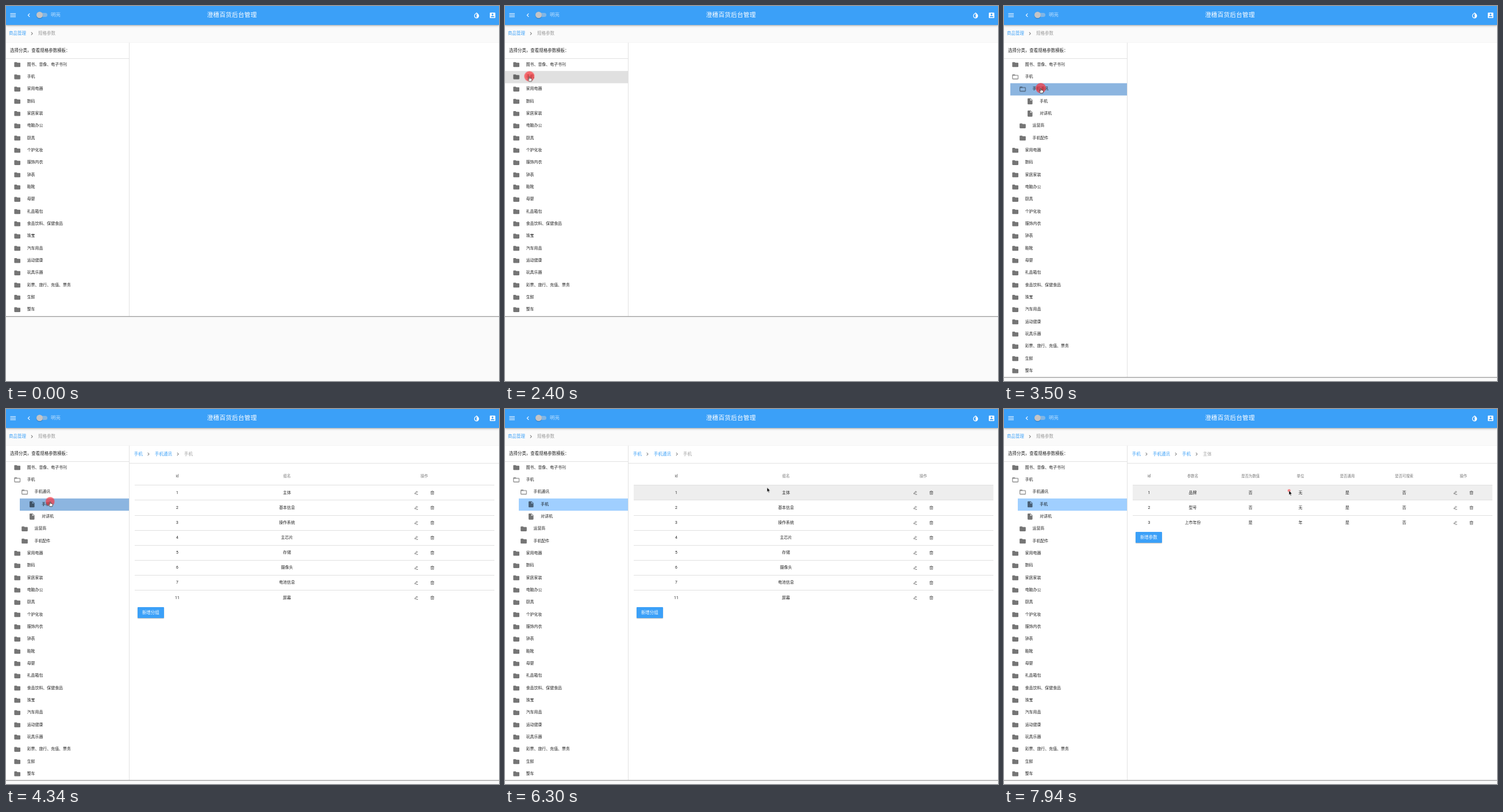
These frames come from a looping animation (858 px wide and 653 px high, 8000 ms). An HTML page:

```html
<!DOCTYPE html>
<html lang="zh-CN">
<head>
<meta charset="utf-8">
<title>后台管理</title>
<style>
*{box-sizing:border-box}
html,body{margin:0;width:100%;height:100%;overflow:hidden}
body{position:relative;background:#fafafa;color:rgba(0,0,0,.87);
  font:6.93px/1 Roboto,"Noto Sans CJK SC","Noto Sans CJK",sans-serif;white-space:nowrap}
.abs,.abs>*,.row>*{position:absolute}
svg{display:block;overflow:visible;fill:currentColor}
.line{fill:none;stroke:currentColor;stroke-width:1.8}

.bar{left:0;top:0;width:100%;height:33px;background:#3ba0f8;color:#fff;
  box-shadow:0 1px 2px rgba(0,0,0,.22),0 2px 4px rgba(0,0,0,.14)}
.title{left:349.7px;top:10.6px;font-size:10.67px;font-weight:500;letter-spacing:.2px}
.track{left:54px;top:12.3px;width:18px;height:7px;border-radius:4px;background:#80b6e6}
.knob{left:53px;top:10px;width:11px;height:11px;border-radius:50%;background:#c4c4c6;
  box-shadow:0 1px 1px rgba(0,0,0,.25)}
.mode{left:78px;top:11.2px;font-size:8.53px;color:rgba(255,255,255,.68)}

.crumb{font-size:7.47px;color:#3ba0f8}
.grey{color:rgba(0,0,0,.38)}
.sep{color:rgba(0,0,0,.54)}

.card{position:absolute;left:0;top:63px;width:100%;height:478px;background:#fff;
  border-top:1px solid #f4f4f4;border-bottom:1px solid #999;box-shadow:0 1px 1px rgba(0,0,0,.1);
  animation:card 8s linear infinite}
.side{position:relative;width:215px;height:100%;border-right:1px solid #e2e2e2}
.head{height:28px;border-bottom:1px solid #e2e2e2;padding:9.9px 0 0 7px;font-size:7.47px}

.tree,.tree>*,.kids,.row{position:absolute;left:0;top:0;width:214px}
.row{height:21.33px}
.row>svg{color:rgba(0,0,0,.54)}
.row>span{top:7.4px}
.kids{overflow:hidden}
.outer{animation:outer 8s linear infinite}
.inner{animation:inner 8s linear infinite}
.tail{animation:tail 8s linear infinite}
.rest{animation:rest 8s linear infinite}

.marks{position:absolute;left:0;top:0}
.marks rect{opacity:0;animation:8s step-end infinite}
.on{fill:#a0cfff}
.over{fill:rgba(0,0,0,.12)}
.marks .a1{animation-name:a1}.marks .a2{animation-name:a2}.marks .a3{animation-name:a3}
.marks .o1{animation-name:o1}.marks .o2{animation-name:o2}.marks .o3{animation-name:o3}

.open1{animation:open1 8s step-end infinite}
.shut1{animation:shut1 8s step-end infinite}
.open2{animation:open2 8s step-end infinite}
.shut2{animation:shut2 8s step-end infinite}

.pane{left:0;top:0;opacity:0;animation:8s step-end infinite}
#groups{animation-name:groups}
#params{animation-name:params}
.rule{left:224px;width:626px;height:1px;background:#e0e0e0}
.cell{width:100px;text-align:center}
.th{font-size:6.4px;font-weight:500;color:rgba(0,0,0,.54)}
.hot{left:224px;top:133px;width:626px;height:26px;background:#eee;opacity:0}
#groups .hot{animation:hot1 8s linear infinite}
#params .hot{animation:hot2 8s linear infinite}
.btn{left:228.6px;width:46.5px;height:19.2px;border-radius:1px;background:#3ba0f8;color:#fff;
  font-size:7.47px;font-weight:500;line-height:19px;text-align:center;
  box-shadow:0 1px 1.5px rgba(0,0,0,.28)}

.mouse{left:0;top:0;animation:move 8s linear infinite,seen 8s step-end infinite}
.dot{left:-9.2px;top:-9.2px;width:18.4px;height:18.4px;border-radius:50%;
  background:rgba(255,44,50,.66);animation:click 8s linear infinite}
.arrow{left:0;top:0;animation:arrow 8s step-end infinite}
.hand{left:0;top:0;animation:hand 8s step-end infinite}

@keyframes card{
  0%,30.75%{height:478px;animation-timing-function:ease-out}
  33.75%,41.25%{height:542px;animation-timing-function:ease-out}
  43.6%,100%{height:584px}}
@keyframes outer{
  0%,30.75%{height:134.5px;animation-timing-function:ease-out}
  33.75%,41.25%{height:198.5px;animation-timing-function:ease-out}
  43.6%,100%{height:241.1px}}
@keyframes inner{
  0%,41.25%{height:155.8px;animation-timing-function:ease-out}
  43.6%,100%{height:198.5px}}
@keyframes tail{
  0%,41.25%{transform:none;animation-timing-function:ease-out}
  43.6%,100%{transform:translateY(42.67px)}}
@keyframes rest{
  0%,30.75%{transform:translateY(0);animation-timing-function:ease-out}
  33.75%,41.25%{transform:translateY(64px);animation-timing-function:ease-out}
  43.6%,100%{transform:translateY(106.67px)}}
@keyframes a1{0%{opacity:0}30.5%{opacity:1}41.5%{opacity:0}}
@keyframes a2{0%{opacity:0}41.5%{opacity:1}51.5%{opacity:0}}
@keyframes a3{0%{opacity:0}51.5%,100%{opacity:1}}
@keyframes o1{0%{opacity:0}16.25%{opacity:1}37%{opacity:0}}
@keyframes o2{0%{opacity:0}37%{opacity:1}47.5%{opacity:0}}
@keyframes o3{0%{opacity:0}47.5%{opacity:1}58.75%{opacity:0}}
@keyframes open1{0%{opacity:0}30.75%,100%{opacity:1}}
@keyframes shut1{0%{opacity:1}30.75%,100%{opacity:0}}
@keyframes open2{0%{opacity:0}41.25%,100%{opacity:1}}
@keyframes shut2{0%{opacity:1}41.25%,100%{opacity:0}}
@keyframes groups{0%{opacity:0}52.75%{opacity:1}96.25%,100%{opacity:0}}
@keyframes params{0%{opacity:0}96.25%,100%{opacity:1}}
@keyframes hot1{0%,60%{opacity:0}63.5%,100%{opacity:1}}
@keyframes hot2{0%,96.25%{opacity:0}99.25%,100%{opacity:.9}}
@keyframes seen{0%{opacity:0}3.75%{opacity:1}8.75%{opacity:0}13.5%,100%{opacity:1}}
@keyframes arrow{0%{opacity:1}16.25%{opacity:0}58.75%,100%{opacity:1}}
@keyframes hand{0%{opacity:0}16.25%{opacity:1}58.75%,100%{opacity:0}}
@keyframes click{
  0%,28.5%{transform:scale(0)}30%,32.25%{transform:scale(1)}
  35.5%,40.25%{transform:scale(0)}41.75%,44%{transform:scale(1)}
  47.25%,50.06%{transform:scale(0)}51.56%,53.81%{transform:scale(1)}
  57.06%,93.5%{transform:scale(0)}95%,97.25%{transform:scale(1)}
  100%{transform:scale(0)}}
@keyframes move{
  0%,3.75%{transform:translate(237px,553px)}
  5%,7%{transform:translate(132px,209px)}
  7.8%{transform:translate(72px,219px)}
  8.75%{transform:translate(4px,205px)}
  13.5%{transform:translate(6px,101px);animation-timing-function:ease-out}
  23.5%{transform:translate(43px,124px)}
  27.5%,34.75%{transform:translate(42.5px,122.5px);animation-timing-function:ease-in-out}
  39.4%,44.75%{transform:translate(64px,143px);animation-timing-function:ease-in-out}
  48.75%,55%{transform:translate(76.8px,161px);animation-timing-function:ease-in}
  58.75%{transform:translate(214px,149px);animation-timing-function:ease-out}
  61%,63.75%{transform:translate(267px,155px)}
  66.75%{transform:translate(349px,131px);animation-timing-function:ease-out}
  68.75%,72.5%{transform:translate(382px,131px);animation-timing-function:ease-in-out}
  82.5%{transform:translate(486.5px,139px)}
  83.25%,85.5%{transform:translate(487px,140px)}
  86.75%,89.75%{transform:translate(490px,140.5px)}
  91.25%,100%{transform:translate(496px,142px)}}
</style>
</head>
<body>
<svg width="0" height="0" style="position:absolute">
  <symbol id="menu" viewBox="0 0 24 24"><path d="M3 6h18v2H3zM3 11h18v2H3zM3 16h18v2H3z"/></symbol>
  <symbol id="left" viewBox="0 0 24 24"><path d="M15.4 7.4 14 6l-6 6 6 6 1.4-1.4-4.6-4.6z"/></symbol>
  <symbol id="right" viewBox="0 0 24 24"><path d="M10 6 8.6 7.4l4.6 4.6-4.6 4.6L10 18l6-6z"/></symbol>
  <symbol id="drop" viewBox="0 0 24 24"><path d="M17.7 7.9 12 2.3 6.3 7.9a8 8 0 0 0 0 11.3 8 8 0 0 0 11.4 0 8 8 0 0 0 0-11.3zM12 19.6a6 6 0 0 1-4.2-10.2L12 5.1z"/></symbol>
  <symbol id="user" viewBox="0 0 24 24"><path d="M3 5v14a2 2 0 0 0 2 2h14a2 2 0 0 0 2-2V5a2 2 0 0 0-2-2H5a2 2 0 0 0-2 2zm12 4a3 3 0 1 1-6 0 3 3 0 0 1 6 0zm-9 8c0-2 4-3.1 6-3.1s6 1.1 6 3.1v1H6z"/></symbol>
  <symbol id="folder" viewBox="0 0 24 24"><path d="M10 4H4a2 2 0 0 0-2 2v12a2 2 0 0 0 2 2h16a2 2 0 0 0 2-2V8a2 2 0 0 0-2-2h-8z"/></symbol>
  <symbol id="opened" viewBox="0 0 24 24"><path d="M20 6h-8l-2-2H4a2 2 0 0 0-2 2v12a2 2 0 0 0 2 2h16a2 2 0 0 0 2-2V8a2 2 0 0 0-2-2zm0 12H4V8h16z"/></symbol>
  <symbol id="file" viewBox="0 0 24 24"><path d="M6 2a2 2 0 0 0-2 2v16a2 2 0 0 0 2 2h12a2 2 0 0 0 2-2V8l-6-6zm7 7V3.5L18.5 9z"/></symbol>
  <symbol id="edit" viewBox="0 0 24 24"><path class="line" d="M5 17.5V14L15 4l3.5 3.5-10 10zM11 20.5h10"/></symbol>
  <symbol id="trash" viewBox="0 0 24 24"><path class="line" d="M2 6h20M8 6V3h8v3M5 6v15h14V6M10 10v7M14 10v7"/></symbol>
</svg>

<div class="abs bar" id="bar">
  <div class="track"></div><div class="knob"></div>
  <span class="mode">明亮</span>
  <span class="title">澄穗百货后台管理</span>
</div>
<div class="abs" id="path" style="left:0;top:0"></div>

<div class="card">
  <div class="side"><div class="head">选择分类，查看规格参数模板：</div></div>
</div>
<svg class="marks" width="214" height="653" id="marks"></svg>
<div class="tree" id="tree"></div>

<div class="abs pane" id="groups"></div>
<div class="abs pane" id="params"></div>

<div class="abs mouse">
  <div class="dot"></div>
  <svg class="arrow" width="1" height="1"><path d="M0 0V7.7L1.7 6.1 2.9 8.9 4.1 8.4 2.9 5.7H5.3Z" fill="#000" stroke="#fff" stroke-width=".5"/></svg>
  <svg class="hand" width="1" height="1"><path d="M-.8 1Q0-.4.8 1V3.3L3.7 4Q4.7 4.3 4.4 5.6L3.7 8.8H-.4L-2.8 5.5Q-2.6 4.4-1.6 5L-.8 5.7Z" fill="#fff" stroke="#111" stroke-width=".7"/></svg>
</div>

<script>
const $ = id => document.getElementById(id);
const NODE = 21.333, FIRST = 91.8, INDENT = 12.8;
const ROW = 26.13, TOP = 132.8;

// a transform keeps the fractional position that left and top would round
const icon = (name, x, y, size = 12.8, cls = '') =>
  `<svg class="${cls}" width="${size}" height="${size}" style="left:0;top:0;` +
  `transform:translate(${x - size / 2}px,${y - size / 2}px)"><use href="#${name}"/></svg>`;

const label = (text, x, y, cls) => `<span class="${cls}" style="left:${x}px;top:${y}px">${text}</span>`;

// breadcrumb items are [text, x]; the last one is greyed out
const crumbs = (items, y) => items.map(([text, x], i) => {
  const last = i === items.length - 1;
  return label(text, x, y - 3.9, 'crumb' + (last ? ' grey' : '')) +
    (last ? '' : icon('right', x + text.length * 7.47 + 10.2, y, 11, 'sep'));
}).join('');

function node(text, n, level = 0, kind = 'folder', step = 0) {
  const x = 19.7 + level * INDENT, y = 10.2;
  const icons = step
    ? icon('folder', x, y, 12.8, 'shut' + step) + icon('opened', x, y, 12.8, 'open' + step)
    : icon(kind, x, y);
  return `<div class="row" style="transform:translateY(${FIRST + NODE * n}px)">` +
    `${icons}<span style="left:${x + 17}px">${text}</span></div>`;
}

const mark = (cls, level, left) =>
  `<rect class="${cls}${level}" x="${left}" y="${FIRST + NODE * level}" width="${214 - left}" height="${NODE}"/>`;

const cell = (text, x, y, cls = '') => label(text, x - 50, y - 3.25, 'cell ' + cls);

function table(cols, heads, rows, button) {
  const tools = cols[cols.length - 1];
  let html = '<div class="hot"></div>';
  heads.forEach((h, i) => html += cell(h, cols[i], 117.4, 'th'));
  rows.forEach((r, n) => {
    const y = TOP + ROW * (n + .5);
    html += `<div class="rule" style="top:${TOP + ROW * n - .5}px"></div>`;
    r.forEach((text, i) => html += cell(text, cols[i], y));
    html += icon('edit', tools - 14, y, 8.2) + icon('trash', tools + 14, y, 7.6);
  });
  return html + `<div class="btn" style="top:${TOP + ROW * rows.length + 3}px">${button}</div>`;
}

const headRule = '<div style="left:215px;top:93.5px;width:643px;height:1px;background:#e2e2e2"></div>';

$('bar').insertAdjacentHTML('beforeend',
  icon('menu', 12.2, 16) + icon('left', 39.8, 16) + icon('drop', 819, 16.3) + icon('user', 846.8, 16.2));
$('path').innerHTML = crumbs([['商品管理', 5], ['规格参数', 56]], 48);

$('marks').innerHTML = ['on a', 'over o'].map(cls =>
  mark(cls, 1, 0) + mark(cls, 2, 11) + mark(cls, 3, 24)).join('');

const rest = ('家用电器 数码 家居家装 电脑办公 厨具 个护化妆 服饰内衣 钟表 鞋靴 母婴 礼品箱包 ' +
  '食品饮料、保健食品 珠宝 汽车用品 运动健康 玩具乐器 彩票、旅行、充值、票务 生鲜 整车').split(' ');
$('tree').innerHTML = node('图书、音像、电子书刊', 0) + node('手机', 1, 0, '', 1) +
  '<div class="kids outer">' + node('手机通讯', 2, 1, '', 2) +
  '<div class="kids inner">' + node('手机', 3, 2, 'file') + node('对讲机', 4, 2, 'file') + '</div>' +
  '<div class="tail">' + node('运营商', 3, 1) + node('手机配件', 4, 1) + '</div></div>' +
  '<div class="rest">' + rest.map((text, i) => node(text, i + 2)).join('') + '</div>';

const trail = [['手机', 222.7], ['手机通讯', 259], ['手机', 310]];
const names = ['主体', '基本信息', '操作系统', '主芯片', '存储', '摄像头', '电池信息', '屏幕'];
$('groups').innerHTML = headRule + crumbs(trail, 78.4) +
  table([298, 489, 728], ['id', '组名', '操作'], names.map((n, i) => [i < 7 ? i + 1 : 11, n]), '新增分组');
$('params').innerHTML = headRule + crumbs([...trail, ['主体', 346.3]], 78.4) +
  table([252.5, 328.5, 429, 516, 597.5, 696.5, 799.5],
    ['id', '参数名', '是否为数值', '单位', '是否通用', '是否可搜索', '操作'],
    [[1, '品牌', '否', '无', '是', '否'], [2, '型号', '否', '无', '是', '否'], [3, '上市年份', '是', '年', '是', '否']],
    '新增参数');
</script>
</body>
</html>
```
